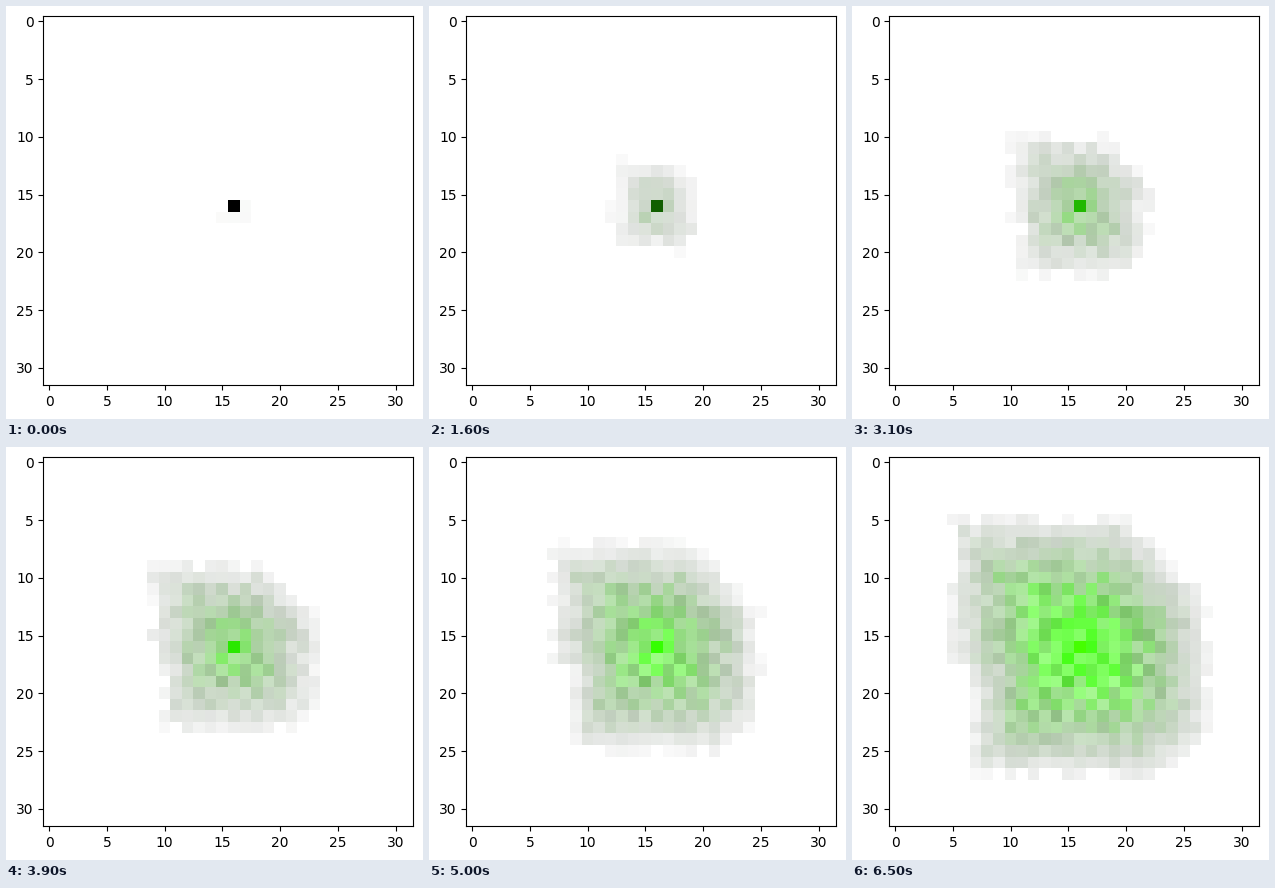
Write a matplotlib script that moves like this. It is 417x413 px and loops after 6600 ms.

```python
import matplotlib.pyplot as plt
import numpy as np
from matplotlib.animation import FuncAnimation

W, H, DPI = 417, 413, 100
STEP, FRAMES = 100, 66
N, MID = 32, 16

# Moments (ms) at which the colony spreads, and those at which only the core brightens.
SPREAD = [0, 900, *range(1600, 3401, 300), 3900,
          *range(4400, 5301, 300), 5400, *range(5600, 6600, 100)]
CORE = SPREAD + [200, 600, 1100, 1300, 3600, 4100]

rng = np.random.default_rng(11)
rows, cols = np.mgrid[:N, :N]
dx, dy = cols - MID, rows - MID


def reach():
    """Distance from the core: a square with blunted corners, slower to the southwest."""
    square = np.maximum(np.abs(dx), np.abs(dy))
    northeast = (dx - dy) / 1.35
    southeast = (dx + dy) / 1.65
    southwest = np.where(dy >= 2, -1.18 * dx, 0)
    return np.maximum.reduce([square, northeast, southeast, southwest])


distance = reach() + rng.uniform(-.45, .55, (N, N))
density = rng.uniform(.75, 1.25, (N, N))
greenness = rng.uniform(.8, 1.2, (N, N))
sprout = (dy == 1) & (np.abs(dx) <= 1) | (dy == 0) & (dx == 1)


def last(moments, t):
    return max(m for m in moments if m <= t)


def opacity(age):
    grown = .02 + .085 * age ** .93 * density
    return np.where(age > 0, np.minimum(grown, .9), 0)


def picture(t):
    spread, core = last(SPREAD, t), last(CORE, t)
    front = np.interp(spread, [900, 1600, 6500], [1.5, 3.7, 11.3])
    age = np.maximum(front - distance, 0)
    alpha = opacity(age) if spread else .02 * sprout
    green = alpha * np.minimum(.12 * age * greenness, 1)
    img = np.dstack([1 - alpha + .2 * green, 1 - alpha + green, 1 - alpha])
    img[MID, MID] = .0107 * core / 255, min(1, .0595 * core / 255), 0
    return img


fig = plt.figure(figsize=(W / DPI + 1e-6, H / DPI + 1e-6), dpi=DPI)
side = 369.6
ax = fig.add_axes([37.42 / W, 33.72 / H, side / W, side / H])
image = ax.imshow(picture(0), interpolation="nearest")


def update(i):
    image.set_data(picture(i * STEP))
    return [image]


anim = FuncAnimation(fig, update, frames=FRAMES, interval=STEP,
                     repeat=True, repeat_delay=0)
plt.show()
```
